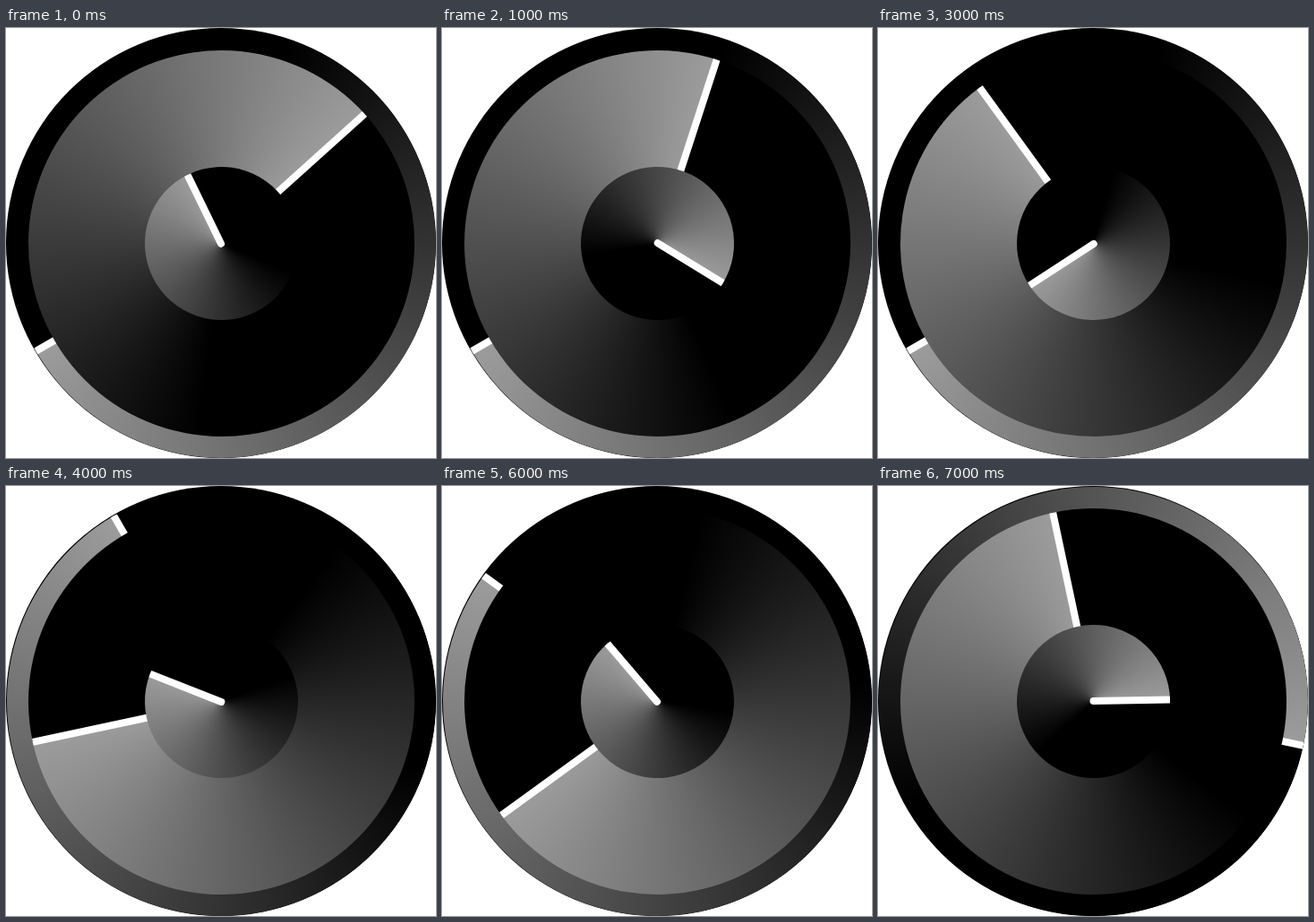
Write an HTML page with a canvas that moves like this. It is 480x480 px and loops after 8 s.

```html
<!DOCTYPE html>
<html>
<head>
<meta charset="utf-8">
<style>
  html, body { margin: 0; height: 100%; overflow: hidden; background: #fff; }
  canvas { display: block; background: #000; border-radius: 50%; }
</style>
</head>
<body>
<canvas id="stage" width="480" height="480"></canvas>
<script>
const ctx = document.getElementById('stage').getContext('2d');
const TURN = 2 * Math.PI;
const STEP_MS = 1000;
const CENTER = 240.5;

// Clock readings, one per step: hours, minutes, seconds
const times = [
  [11, 8, 40], [4, 3, 40], [2, 16, 54], [7, 54, 40],
  [9, 43, 55], [6, 49, 1], [10, 39, 51], [2, 58, 17]
];

// A disc with a fading trail behind a white hand; turn is 0..1 clockwise from the top
function drawDisc(radius, turn) {
  ctx.save();
  ctx.translate(CENTER, CENTER);
  ctx.rotate((turn - 0.25) * TURN);

  const trail = ctx.createConicGradient(0, 0, 0);
  trail.addColorStop(0, '#000');
  trail.addColorStop(0.385, '#000');
  trail.addColorStop(1, '#9c9c9c');
  ctx.beginPath();
  ctx.arc(0, 0, radius, 0, TURN);
  ctx.fillStyle = trail;
  ctx.fill();
  ctx.clip();

  // The hand sits slightly towards its trail
  ctx.beginPath();
  ctx.moveTo(0, -0.5);
  ctx.lineTo(radius, -0.5);
  ctx.lineWidth = 8;
  ctx.lineCap = 'round';
  ctx.strokeStyle = '#fff';
  ctx.stroke();
  ctx.restore();
}

function frame(now) {
  const [hours, minutes, seconds] = times[Math.floor(now / STEP_MS) % times.length];
  ctx.clearRect(0, 0, 480, 480);
  drawDisc(239.5, seconds / 60);
  drawDisc(215.5, minutes / 60);
  drawDisc(85.5, (hours + minutes / 60) / 12);
  requestAnimationFrame(frame);
}

frame(0);
</script>
</body>
</html>
```
